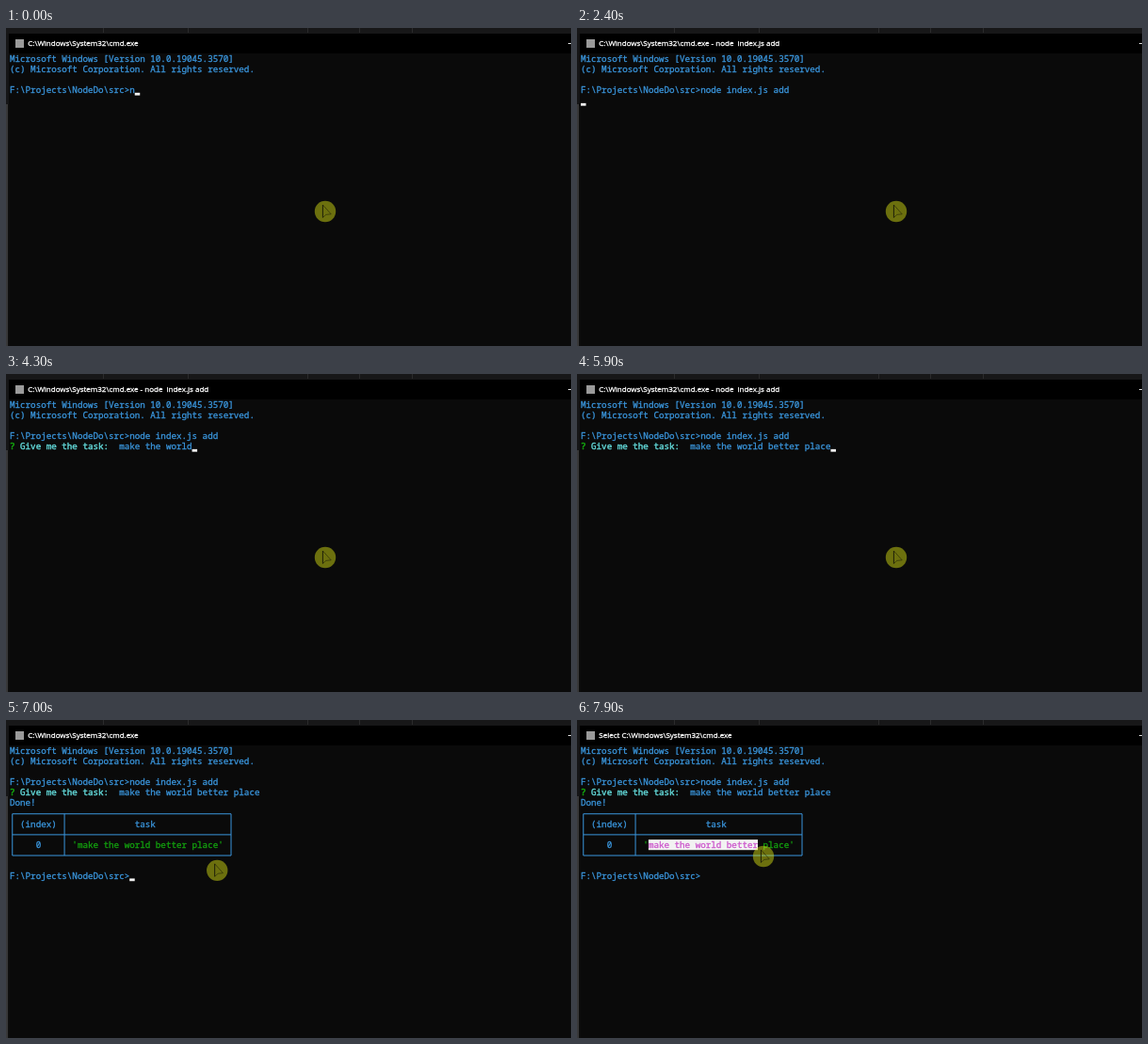
Recreate the animation shown at these times as an HTML page with a canvas. Size 600 px wide and 338 px high, loop 8000 ms.

```html
<!DOCTYPE html>
<html lang="en">
<head>
<meta charset="utf-8">
<title>Terminal to-do demo</title>
<style>
  html, body { margin: 0; width: 100%; height: 100%; overflow: hidden; background: #0a0a0a; }
  canvas { display: block; width: 600px; height: 338px; }
</style>
</head>
<body>
<canvas id="stage" width="600" height="338"></canvas>
<script>
const ctx = document.getElementById('stage').getContext('2d');
const LOOP = 8000, KEY_MS = 100;
const LEFT = 4, TOP = 27.8, CELL_W = 5.53, CELL_H = 11.07;
const MONO = `${CELL_W / 0.6}px "Noto Sans Mono", "DejaVu Sans Mono", monospace`;
const SANS = '8px "Open Sans", "Noto Sans", sans-serif';
const BLUE = '#3a96dd', GREEN = '#13a10e', TEAL = '#61d6d6', LIGHT = '#f2f2f2';

const ENTER = 2300, ASK = 2800, DONE = 6000, SELECT = 7600;
const PROMPT = 'F:\\Projects\\NodeDo\\src>';
const PATH = 'C:\\Windows\\System32\\cmd.exe';
const TASK = 'make the world better place';

// Bursts of typing: start time and the keys pressed, one per KEY_MS
const COMMAND = [[0, 'n'], [100, 'ode '], [600, 'inde'], [1100, 'x'], [1400, '.js '], [1900, 'add']];
const ANSWER = [[3000, 'make '], [3600, 'the worl'], [4300, 'd better p'], [5600, 'lace']];

// Pointer highlight centre: time, x, y
const MOUSE = [[6750, 339, 195], [6900, 293, 181], [7000, 225, 160], [7100, 150, 147],
  [7200, 105, 143], [7350, 82, 143], [7500, 82, 143], [7600, 95, 143],
  [7700, 130, 144], [7800, 170, 145], [7900, 198, 145]];

const colX = col => LEFT + col * CELL_W;
const rowY = row => TOP + row * CELL_H;

function typed(bursts, t) {
  return bursts.map(([start, keys]) =>
    t < start ? '' : keys.slice(0, Math.floor((t - start) / KEY_MS) + 1)).join('');
}

function mouseAt(t) {
  const next = MOUSE.findIndex(p => p[0] > t);
  if (next === 0) return MOUSE[0].slice(1);
  if (next < 0) return MOUSE[MOUSE.length - 1].slice(1);
  const [t0, x0, y0] = MOUSE[next - 1], [t1, x1, y1] = MOUSE[next];
  const k = (t - t0) / (t1 - t0);
  return [x0 + (x1 - x0) * k, y0 + (y1 - y0) * k];
}

function rect(x, y, w, h, color) {
  ctx.fillStyle = color;
  ctx.fillRect(x, y, w, h);
}

// A thin outline gives the small type its sturdier weight
function inkText(text, x, y, color, weight) {
  ctx.fillStyle = ctx.strokeStyle = color;
  ctx.lineWidth = weight;
  ctx.lineJoin = 'round';
  ctx.fillText(text, x, y);
  ctx.strokeText(text, x, y);
}

function put(row, col, text, color = BLUE, weight = 0.3) {
  ctx.font = MONO;
  [...text].forEach((ch, i) => inkText(ch, colX(col + i), rowY(row) + 8.3, color, weight));
}

function caret(row, col) {
  rect(colX(col), rowY(row) + 7.8, CELL_W, 2.8, LIGHT);
}

function drawWindow(t) {
  rect(0, 0, 600, 338, '#0a0a0a');
  rect(0, 0, 600, 6, '#171718');
  for (const x of [103, 193, 320, 375, 431]) rect(x, 0, 1, 5, '#2b2b2c');
  rect(0, 6, 3, 75, '#151516');
  rect(0, 81, 2, 257, '#383839');
  rect(2, 81, 1.5, 257, '#0e0e0e');
  rect(3, 6, 597, 21, '#000');
  rect(10, 12, 9, 9, '#9a9a9a');
  rect(597, 16, 3, 1, '#ddd');

  let title = PATH;
  if (t >= ENTER && t < DONE) title += ' - node  index.js add';
  if (t >= SELECT) title = 'Select ' + title;
  ctx.font = SANS;
  inkText(title, 23.3, 19.4, '#fff', 0.3);
}

function drawTable() {
  const [x0, x1, x2] = [0.5, 10.5, 42.5].map(colX);
  const [y0, y1, y2] = [6.5, 8.5, 10.5].map(rowY);
  ctx.strokeStyle = BLUE;
  ctx.lineWidth = 1;
  ctx.beginPath();
  ctx.rect(x0, y0, x2 - x0, y2 - y0);
  ctx.moveTo(x0, y1);
  ctx.lineTo(x2, y1);
  ctx.moveTo(x1, y0);
  ctx.lineTo(x1, y2);
  ctx.stroke();
  put(7, 2, '(index)');
  put(7, 24, 'task');
  put(9, 5, '0');
  put(9, 12, `'${TASK}'`, GREEN);
}

function drawSelection(mouseX) {
  const end = Math.floor((mouseX - 3 - LEFT) / CELL_W);
  const count = Math.max(0, end - 13);
  rect(colX(13), rowY(9) - 0.3, count * CELL_W, CELL_H, LIGHT);
  put(9, 13, TASK.slice(0, count), '#cc55cc');
}

function drawConsole(t, mouseX) {
  put(0, 0, 'Microsoft Windows [Version 10.0.19045.3570]');
  put(1, 0, '(c) Microsoft Corporation. All rights reserved.');
  const line = PROMPT + typed(COMMAND, t);
  put(3, 0, line);
  if (t < ENTER) return caret(3, line.length);
  if (t < ASK) return caret(4, 0);

  const answer = typed(ANSWER, t);
  put(4, 0, '?', GREEN, 0.6);
  put(4, 2, 'Give me the task:', TEAL, 0.45);
  put(4, 21, answer);
  if (t < DONE) return caret(4, 21 + answer.length);

  put(5, 0, 'Done!');
  drawTable();
  put(12, 0, PROMPT);
  if (t >= SELECT) drawSelection(mouseX);
  else if (Math.floor((t - 5940) / 530) % 2 === 0) caret(12, PROMPT.length);
}

function drawPointer(x, y) {
  ctx.fillStyle = 'rgba(228, 238, 20, 0.45)';
  ctx.beginPath();
  ctx.arc(x, y, 11.2, 0, Math.PI * 2);
  ctx.fill();

  const left = x - 2.6, top = y - 7, bottom = y + 6.5;
  ctx.lineWidth = 0.9;
  ctx.strokeStyle = 'rgba(20, 20, 8, 0.55)';
  ctx.beginPath();
  ctx.moveTo(left, top);
  ctx.lineTo(x + 6.2, y + 2.8);
  ctx.lineTo(x + 0.8, y + 3.4);
  ctx.lineTo(left, bottom);
  ctx.stroke();
  ctx.strokeStyle = '#16160a';
  ctx.beginPath();
  ctx.moveTo(left, top);
  ctx.lineTo(left, bottom);
  ctx.stroke();
}

function frame(now) {
  const t = now % LOOP;
  const [x, y] = mouseAt(t);
  drawWindow(t);
  drawConsole(t, x);
  drawPointer(x, y);
  requestAnimationFrame(frame);
}

frame(0);
</script>
</body>
</html>
```
